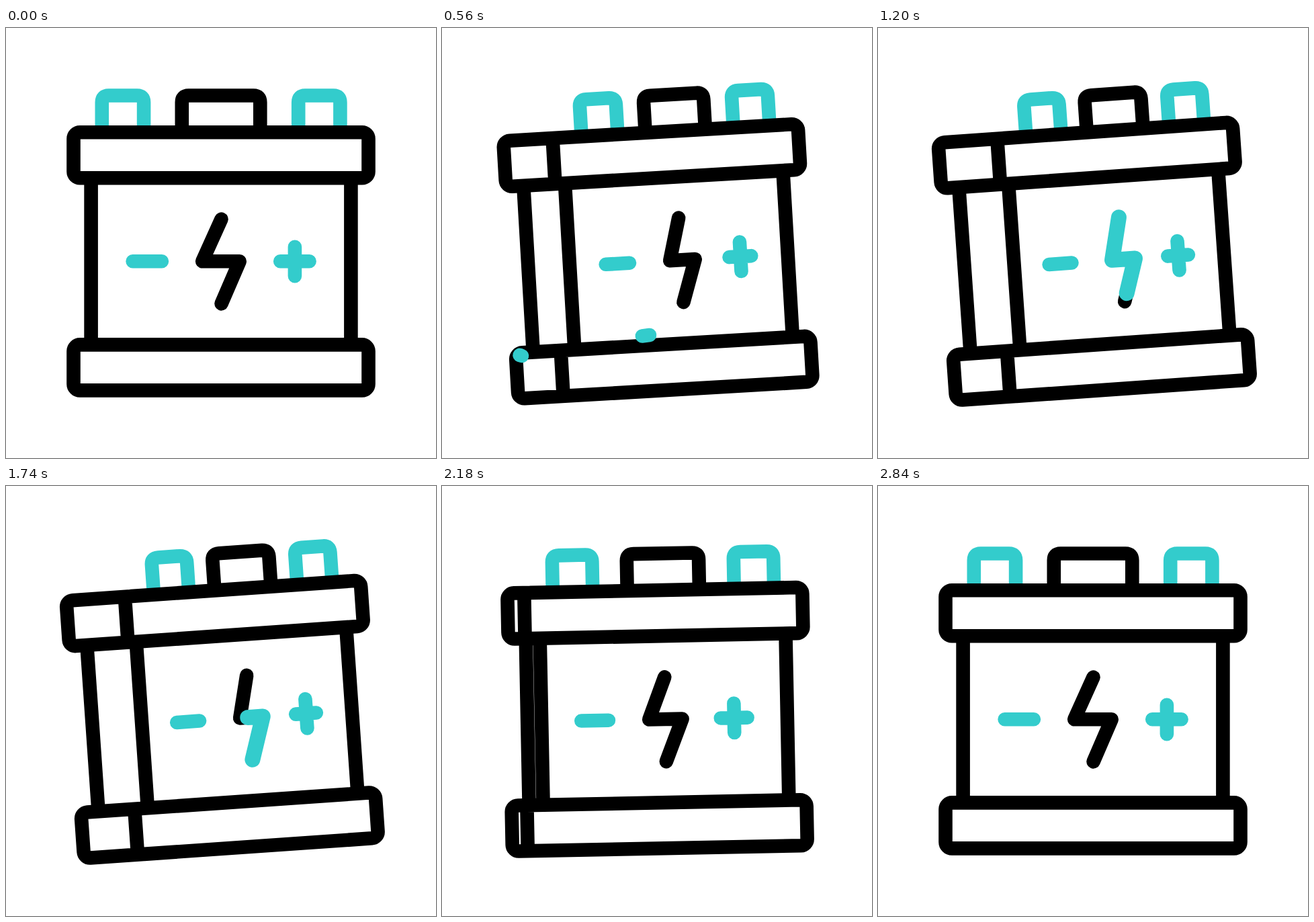
Recreate the animation shown at these times as an HTML page. Size 640 by 640 pixels, loop 3020 ms.

```html
<!DOCTYPE html>
<html lang="en">
<head>
<meta charset="utf-8">
<title>Battery</title>
<style>
  html, body { margin: 0; width: 100%; height: 100%; overflow: hidden; background: #fff; }
  svg { display: block; width: 100vw; height: 100vh; }
  path { fill: none; stroke: #000; stroke-width: 20.6; }
  .teal { stroke: #3cc; }
  .round { stroke-linecap: round; stroke-linejoin: round; }
  #glow { stroke-width: 23; }
</style>
</head>
<body>
<svg viewBox="0 0 640 640">
  <g id="battery">
    <path id="tabs" class="teal"/>
    <path id="handle"/>
    <path id="walls"/>
    <path id="cases"/>
    <path id="signs" class="teal round"/>
    <path id="bolt" class="round"/>
    <path id="glow" class="teal round" pathLength="1"/>
  </g>
  <path id="swooshA" class="teal round" pathLength="1" d="M62 375C82 445 190 474 309 457"/>
  <path id="swooshB" class="teal round" pathLength="1" d="M42 440C62 462 90 479 119 488"/>
</svg>
<script>
const LOOP = 3020, STEP = 20, TILT = 4;
const el = id => document.getElementById(id);
const shape = (id, d) => el(id).setAttribute('d', d);
const ramp = (t, a, b) => Math.min(1, Math.max(0, (t - a) / (b - a)));

// Eased 0..1 with flat ends; x1 and x2 are the handle lengths in time
function ease(x, x1, x2) {
  let lo = 0, hi = 1;
  for (let i = 0; i < 30; i++) {
    const s = (lo + hi) / 2, r = 1 - s;
    if (3 * r * r * s * x1 + 3 * r * s * s * x2 + s * s * s < x) lo = s; else hi = s;
  }
  return lo * lo * (3 - 2 * lo);
}

const arch = (l, r) =>
  `M${l} 156V110.5Q${l} 100.5 ${l + 10} 100.5H${r - 10}Q${r} 100.5 ${r} 110.5V156`;

function box(l, top, bottom) {
  const r = 539.5, c = 9.5;
  return `M${l + c} ${top}H${r - c}A${c} ${c} 0 0 1 ${r} ${top + c}V${bottom - c}` +
    `A${c} ${c} 0 0 1 ${r - c} ${bottom}H${l + c}A${c} ${c} 0 0 1 ${l} ${bottom - c}` +
    `V${top + c}A${c} ${c} 0 0 1 ${l + c} ${top}Z`;
}

function trim(id, from, to, alpha = 1) {
  const path = el(id), len = to - from;
  path.style.opacity = len > 0.001 ? alpha : 0;
  path.style.strokeDasharray = `${Math.max(len, 0.001)} 3`;
  path.style.strokeDashoffset = -from;
}

// p: 0 seen from the front, 1 turned
function drawBattery(p) {
  const at = (x, shift) => x + shift * p;
  el('battery').setAttribute('transform', `rotate(${-TILT * p} 320 320)`);
  shape('tabs', arch(at(142.8, 89), at(205.1, 79)) + arch(at(435.2, 10), at(497.4, 0)));
  shape('handle', arch(at(261.8, 60.5), at(378.3, 28)));
  shape('walls', `M126.6 223V471M${at(126.6, 74)} 223V471M513.4 223V471`);
  shape('cases', [[155.2, 223.3, 88], [471.4, 539.4, 80.5]].map(([top, bottom, shift]) =>
    box(100.5, top, bottom) + box(at(100.5, shift), top, bottom)).join(''));
  const mid = at(429.9, 15.5);
  shape('signs', `M${at(188.6, 64)} 347.3H${at(231.9, 54.5)}` +
    `M${at(408.2, 21.5)} 347.3H${at(451.6, 8.7)}M${mid} 325.7V369.3`);
  const bolt = `M${at(320.5, 40.5)} 284.6L${at(292.2, 54.5)} 347.3` +
    `H${at(347.7, 33)}L${at(320.5, 40.5)} 410.3`;
  shape('bolt', bolt);
  shape('glow', bolt);
}

function draw(t) {
  const turn = ease(ramp(t, 60, 1140), 0.2, 0.06);
  const back = ease(ramp(t, 1680, 2840), 0.4, 0.14);
  drawBattery(turn - back);

  trim('glow', ramp(t, 1440, 2090), ramp(t, 610, 1250),
    ramp(t, 610, 930) * (1 - ramp(t, 1770, 2090)));

  const head = ease(ramp(t, 60, 360), 0.33, 0.5);
  const tail = ease(ramp(t, 360, 600), 0.33, 0.5);
  trim('swooshA', tail, head);
  trim('swooshB', tail, head);
}

const start = performance.now();
function frame() {
  const t = (performance.now() - start) % LOOP;
  draw(Math.floor(t / STEP) * STEP);
  requestAnimationFrame(frame);
}
frame();
</script>
</body>
</html>
```
